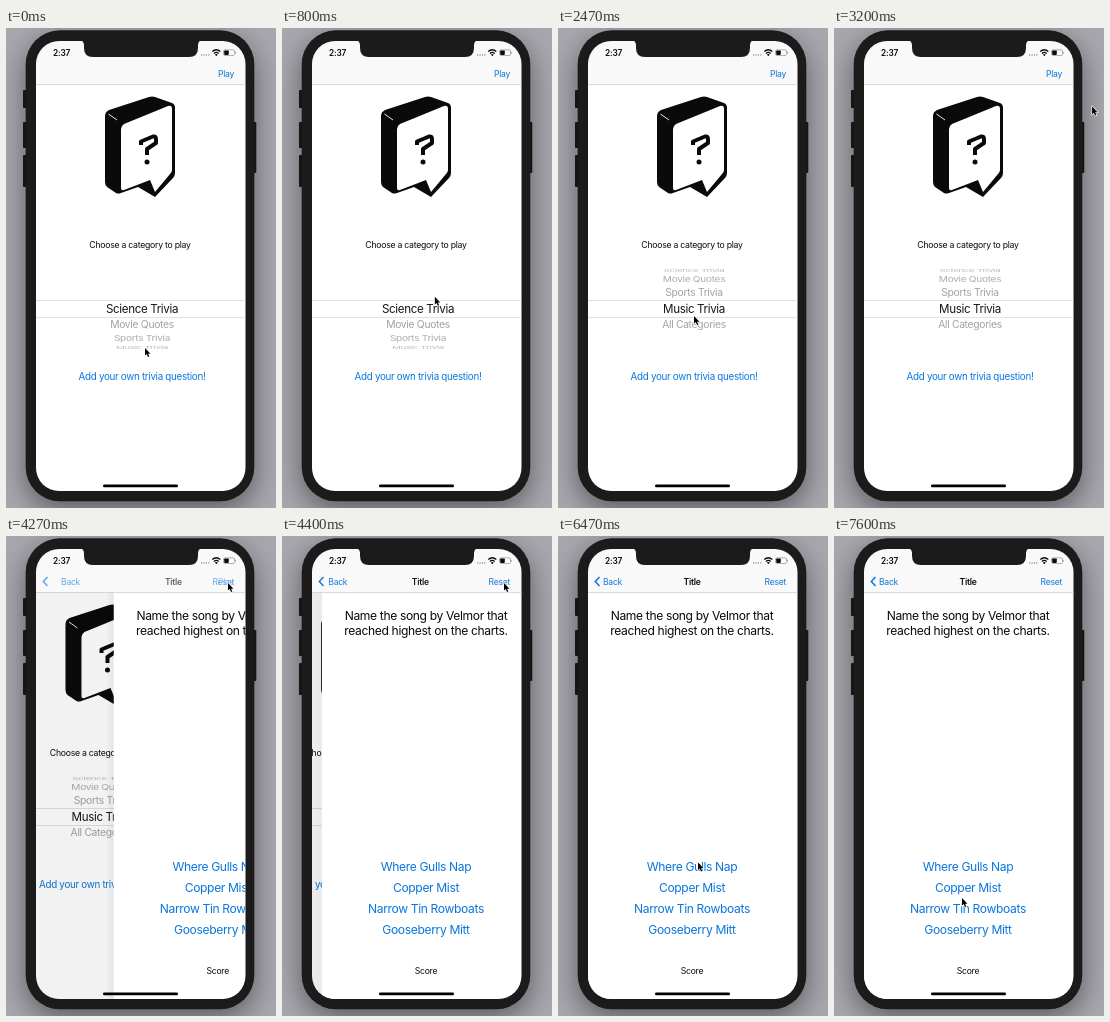
Write an HTML page with a canvas that moves like this. It is 270 px wide and 480 px high and loops after 8 s.

```html
<!DOCTYPE html>
<html lang="en">
<head>
<meta charset="utf-8">
<title>Trivia app</title>
<style>
  html, body { margin: 0; width: 100%; height: 100%; overflow: hidden; background: #a8a7ae; }
  canvas { display: block; }
</style>
</head>
<body>
<canvas id="stage" width="270" height="480"></canvas>
<script>
const ctx = document.getElementById('stage').getContext('2d');
const LOOP = 8000, FPS = 15;
const BLUE = '#0b76dc', BLACK = '#0a0a0a', CASE = '#1b1b1c';
const SCREEN = { x: 30, y: 13, w: 209.5, h: 450 };
const CATEGORIES = ['Science Trivia', 'Movie Quotes', 'Sports Trivia', 'Music Trivia', 'All Categories'];
const ANSWERS = ['Where Gulls Nap', 'Copper Mist', 'Narrow Tin Rowboats', 'Gooseberry Mitt'];

// Each move glides to (x, y); dx and dy bow its path sideways
const MOVES = [
  { from: 0, to: 870, x: 131, y: 340, dx: 87, dy: -284 },
  { from: 930, to: 1470, x: 139, y: 340, dx: -10, dy: -26 },
  { from: 1600, to: 1930, x: 136, y: 288 },
  { from: 2470, to: 3270, x: 259, y: 77 },
  { from: 3800, to: 4130, x: 222, y: 47 },
  { from: 4670, to: 5070, x: 144, y: 247 },
  { from: 5670, to: 6070, x: 140, y: 340, dx: -30, dy: 40 },
  { from: 6400, to: 7200, x: 140, y: 320, dy: -40 },
  { from: 7270, to: 7600, x: 128, y: 362 }
];

const progress = (t, from, to) => Math.min(1, Math.max(0, (t - from) / (to - from)));
const easeOut = u => 1 - (1 - u) ** 2;

function pointerAt(t) {
  let x = 139, y = 320;
  for (const { from, to, dx = 0, dy = 0, ...goal } of MOVES) {
    const u = progress(t, from, to), bow = Math.sin(Math.PI * u);
    x += (goal.x - x) * easeOut(u) + dx * bow;
    y += (goal.y - y) * easeOut(u) + dy * bow;
  }
  return [x, y];
}

// Share of the push still to travel: a critically damped spring
function pushRest(t) {
  const s = Math.max(0, t - 4160) * 0.02;
  return (1 + s) * Math.exp(-s);
}

function box(x, y, w, h, r, color) {
  ctx.fillStyle = color;
  ctx.beginPath();
  ctx.roundRect(x, y, w, h, r);
  ctx.fill();
}

function shape(d, color) {
  ctx.fillStyle = color;
  ctx.fill(new Path2D(d));
}

function line(d, color, width) {
  ctx.strokeStyle = color;
  ctx.lineWidth = width;
  ctx.stroke(new Path2D(d));
}

// y is the middle of the capital letters
function text(str, x, y, size, color = BLACK, align = 'center', weight = 400) {
  ctx.font = `${weight} ${size}px Inter, "Liberation Sans", sans-serif`;
  ctx.letterSpacing = `${-0.03 * size}px`;
  ctx.textAlign = align;
  ctx.fillStyle = color;
  ctx.fillText(str, x, y + 0.36 * size);
}

function scoped(draw) {
  ctx.save();
  draw();
  ctx.restore();
}

function shifted(dx, draw) {
  scoped(() => {
    ctx.translate(dx, 0);
    draw();
  });
}

function faded(alpha, draw) {
  scoped(() => {
    ctx.globalAlpha = alpha;
    draw();
  });
}

function clipped(y, h, draw) {
  scoped(() => {
    ctx.beginPath();
    ctx.rect(SCREEN.x, y, SCREEN.w, h);
    ctx.clip();
    draw();
  });
}

function drawPhone() {
  box(0, 0, 270, 480, 0, '#a8a7ae');
  for (const [y, h] of [[62, 18], [94, 26], [127, 32]]) box(17, y, 5, h, 1, CASE);
  box(246, 94, 4.3, 51, 1, CASE);
  scoped(() => {
    ctx.shadowColor = 'rgba(0,0,0,.45)';
    ctx.shadowBlur = 28;
    ctx.shadowOffsetY = 9;
    box(19.7, 2.3, 228.6, 471, 34, CASE);
  });
}

function drawIcon() {
  shape('M99 88Q99 84 103 82L143 69Q146 68 149 69L166 75Q169 76 169 80V145Q169 148 167 150L149 169 132 159 115 165Q112 166 110 165L101 159Q99 157 99 154Z', BLACK);
  shape('M115 101Q115 98 118 96L162 78Q166 77 166 81V142Q166 144 164 146L149 164 144 152 118 162Q115 163 115 160Z', '#fff');
  line('M102.5 86L111 92', '#fff', 0.9);
  ctx.lineJoin = 'round';
  line('M135 117V113.5L147 108.5Q150 108 150 111V115L141 121V127', BLACK, 4);
  box(138.5, 131.5, 5, 5, 2.5, BLACK);
}

function drawWheel(offset) {
  const radius = 42, step = 0.39;
  const rows = (size, alpha) => CATEGORIES.forEach((name, i) => {
    const angle = (i - offset) * step, facing = Math.cos(angle);
    scoped(() => {
      ctx.globalAlpha = alpha(facing);
      ctx.translate(136, 281 + radius * Math.sin(angle));
      ctx.scale(0.9 + 0.1 * facing, facing);
      text(name, 0, 0, size);
    });
  });
  const far = () => rows(10.4, facing => 0.2 + 0.2 * facing);
  clipped(238, 34, far);
  clipped(290, 34, far);
  clipped(272, 18, () => rows(11.6, () => 0.95));
  line('M30 272.5H240M30 289.5H240', '#dadadc', 0.8);
}

function drawPage(content) {
  box(30, 56, 210, 410, 0, '#fff');
  content();
}

function drawHome(wheel) {
  drawIcon();
  text('Choose a category to play', 134, 217, 8.7);
  drawWheel(wheel);
  text('Add your own trivia question!', 136, 348.5, 9.8, BLUE);
}

function drawQuiz() {
  text('Name the song by Velmor that', 134, 79.5, 12.1);
  text('reached highest on the charts.', 134, 94.5, 12.1);
  ANSWERS.forEach((answer, i) => text(answer, 134, 330.5 + 21.2 * i, 12.1, BLUE));
  text('Score', 134, 435, 8.6);
}

function drawNavBar(rest) {
  box(30, 13, 210, 43, 0, '#f9f9f9');
  line('M30 56.5H240', '#d0d0d3', 0.8);
  faded(rest, () => text('Play', 228, 45.5, 8.6, BLUE, 'right'));
  faded(1 - rest, () => {
    line('M41.5 41L37.3 45.5 41.5 50', BLUE, 1.5);
    text('Back', 45 + 27 * rest, 45.5, 8.6, BLUE, 'left');
    text('Title', 134 + 90 * rest, 45.5, 8.6, BLACK, 'center', 600);
    text('Reset', 228, 45.5, 8.6, BLUE, 'right');
  });
}

function drawStatusBar() {
  shape('M74 12Q78 13 78 17V20Q78 29 87 29H183Q192 29 192 20V17Q192 13 196 12Z', CASE);
  text('2:37', 55.5, 25, 8.3, BLACK, 'center', 600);
  for (let i = 0; i < 4; i++) box(195 + 2.4 * i, 26.3, 1.3, 1.3, 0.6, '#777');
  line('M206.3 23.6Q210.3 20 214.3 23.6M207.9 25.4Q210.3 23.4 212.7 25.4', BLACK, 1.3);
  shape('M208.8 26.6Q210.3 25.5 211.8 26.6L210.3 28.3Z', BLACK);
  box(217.2, 21.5, 11.6, 6.4, 1.8, '#999');
  box(217.9, 22.2, 10.2, 5, 1.3, '#f9f9f9');
  box(218.2, 22.5, 4.6, 4.4, 0.8, BLACK);
  box(229.2, 23.7, 0.9, 2, 0.4, '#999');
}

// The covered page dims, with a soft shadow beside the incoming edge
function drawCover(rest, edge) {
  box(SCREEN.x, SCREEN.y, SCREEN.w, SCREEN.h, 0, `rgba(0,0,0,${0.08 * (1 - rest)})`);
  const shade = ctx.createLinearGradient(edge - 8, 0, edge, 0);
  shade.addColorStop(0, 'rgba(0,0,0,0)');
  shade.addColorStop(1, `rgba(0,0,0,${0.06 * Math.min(1, rest * 4)})`);
  box(edge - 8, SCREEN.y, 8, SCREEN.h, 0, shade);
}

function drawScreen(t) {
  const { x, y, w, h } = SCREEN;
  const rest = pushRest(t);
  scoped(() => {
    ctx.beginPath();
    ctx.roundRect(x, y, w, h, 23);
    ctx.clip();
    const wheel = 3 * progress(t, 1610, 1930);
    shifted(-0.3 * w * (1 - rest), () => drawPage(() => drawHome(wheel)));
    if (rest < 1) {
      drawCover(rest, x + w * rest);
      shifted(w * rest, () => drawPage(drawQuiz));
    }
    drawNavBar(rest);
    drawStatusBar();
    box(97, 456.6, 75, 2.6, 1.3, '#000');
  });
}

function drawPointer(t) {
  const arrow = 'M0 0V8.6L2 6.9 3.4 10.2 4.9 9.6 3.5 6.4H6.2Z';
  scoped(() => {
    ctx.translate(...pointerAt(t));
    ctx.scale(0.88, 0.88);
    line(arrow, '#fff', 1.3);
    shape(arrow, '#000');
  });
}

function frame(now) {
  const t = Math.floor((now % LOOP + 4) * FPS / 1000) * 1000 / FPS % LOOP;
  drawPhone();
  drawScreen(t);
  drawPointer(t);
  requestAnimationFrame(frame);
}
requestAnimationFrame(frame);
</script>
</body>
</html>
```
